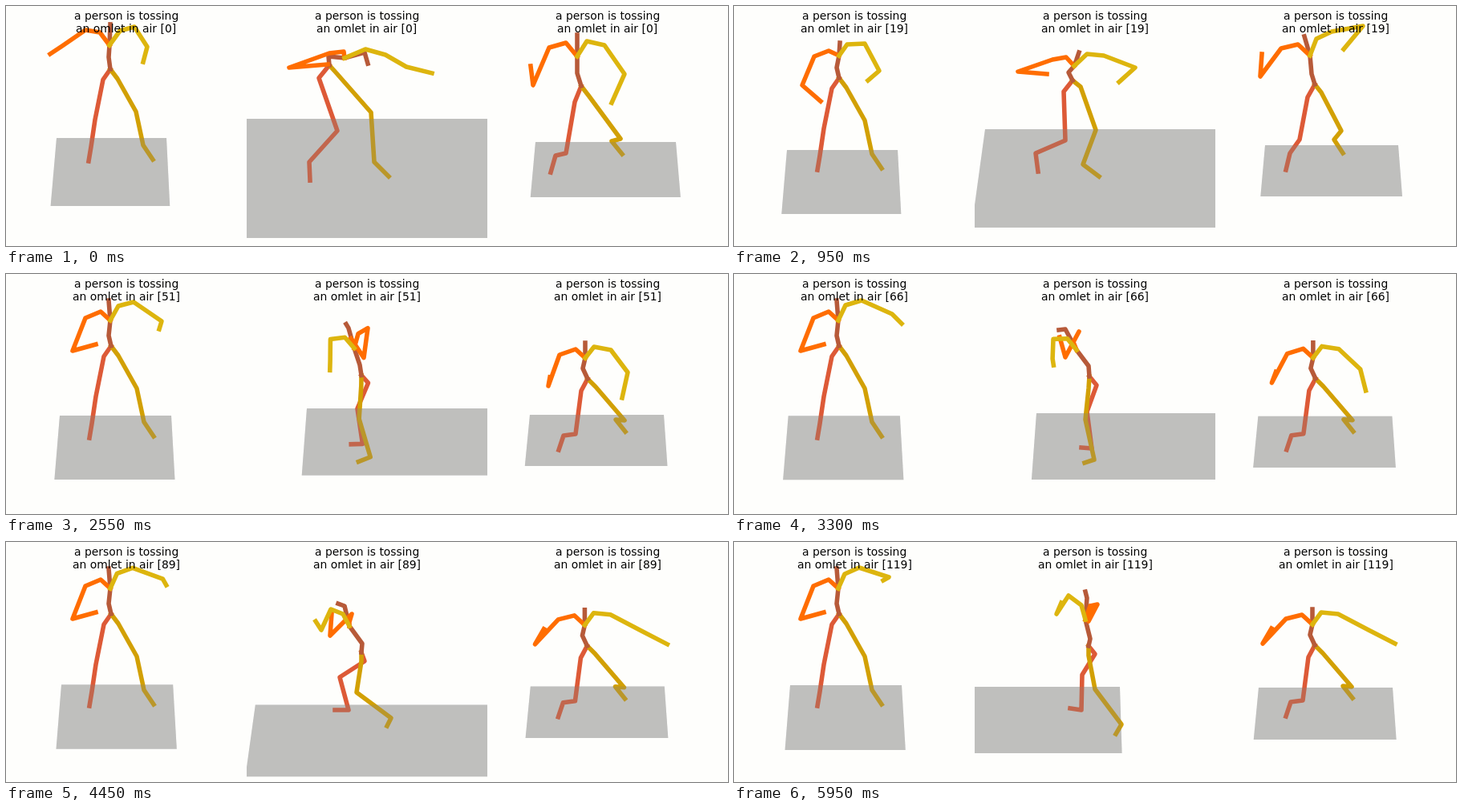
An HTML page with a canvas for the animation above (6 s loop, 900 px wide and 300 px high).

```html
<!DOCTYPE html>
<html lang="en">
<head>
<meta charset="utf-8">
<title>Stick figure motion</title>
<style>
html, body { margin: 0; width: 100%; height: 100%; overflow: hidden; background: #fefefc; }
canvas { display: block; }
</style>
</head>
<body>
<canvas id="stage" width="900" height="300"></canvas>
<script>
const ctx = document.getElementById('stage').getContext('2d');
const STEP = 50, FRAMES = 120, CHEST = 4;
const HAZE = 'rgba(128, 128, 128, 0.3)';

// Eases through a few poses keyed by frame, without overshoot; a lone pose is held.
function motion(keys) {
  const at = Object.keys(keys).map(Number);
  const poses = Object.values(keys);
  const last = at.length - 1;
  const rate = (i, j) => (poses[i + 1][j] - poses[i][j]) / (at[i + 1] - at[i]);
  const slope = (i, j) => {
    if (i === 0 || i === last) return 0;
    const a = rate(i - 1, j), b = rate(i, j);
    return a * b > 0 ? 2 * a * b / (a + b) : 0;
  };
  return f => {
    if (f >= at[last]) return poses[last];
    const i = at.findIndex(k => k > f) - 1;
    const h = at[i + 1] - at[i], u = (f - at[i]) / h, v = 1 - u;
    return poses[i].map((p, j) =>
      v * v * (1 + 2 * u) * p + u * u * (3 - 2 * u) * poses[i + 1][j] +
      h * u * v * (v * slope(i, j) - u * slope(i + 1, j)));
  };
}

// The pelvis is placed on the stage; spine and legs hang on it, arms on the chest.
// Spines run waist, chest, (neck,) head. Floors are left, right, far edge and depth.
const front = {
  center: 150,
  pelvis: motion({ 0: [130, 79], 19: [131, 90] }),
  floor: motion({ 0: [63, 200, 165, 85], 19: [66, 204, 180, 80], 51: [67, 206, 177, 80], 119: [70, 209, 179, 81] }),
  spine: motion({
    0: [-2, -15, -1, -30, 0, -56],
    19: [-3, -13, 0, -28, 1, -44],
    35: [-3, -13, 2, -25, 5, -43],
    51: [-3, -13, -1, -32, -3, -57]
  }),
  rightLeg: motion({ 0: [-9, 13, -19, 63, -24, 97, -27, 115] }),
  leftLeg: motion({ 0: [9, 12, 32, 53, 41, 95, 53, 113] }),
  rightArm: motion({
    0: [-12, -16, -30, -19, -59, 1, -74, 11],
    19: [-13, -6, -31, 1, -46, 37, -23, 57],
    35: [-11, -8, -29, 0, -51, 27, -30, 56],
    51: [-12, -11, -31, -3, -47, 38, -18, 30]
  }),
  leftArm: motion({
    0: [13, -18, 31, -23, 47, 2, 42, 21],
    19: [10, -14, 32, -15, 50, 19, 36, 31],
    35: [11, -15, 31, -21, 55, 6, 49, 7],
    51: [10, -18, 29, -23, 64, 1, 61, 11],
    66: [9, -19, 29, -25, 67, -8, 79, 4],
    119: [8, -18, 26, -26, 63, -14, 56, -10]
  })
};

const middle = {
  center: 450,
  pelvis: motion({ 0: [403, 74], 19: [422, 93], 35: [443, 125], 66: [443, 128], 89: [443, 138], 119: [442, 130] }),
  floor: motion({
    0: [290, 620, 141, 149],
    19: [313, 635, 154, 123],
    35: [369, 660, 163, 86],
    66: [377, 668, 174, 83],
    86: [322, 622, 204, 90],
    119: [190, 481, 181, 83]
  }),
  spine: motion({
    0: [-1, -11, 19, -9, 44, -16, 48, -2],
    19: [-5, -10, 2, -18, 5, -26, 8, -35],
    35: [-2, -14, -19, -36, -30, -62, -36, -69],
    51: [-2, -13, -9, -34, -16, -59, -19, -64],
    66: [-1, -13, -16, -33, -30, -59, -38, -58],
    89: [1, -11, -15, -33, -21, -58, -29, -61],
    119: [2, -9, -4, -33, -2, -60, -4, -68]
  }),
  rightLeg: motion({
    0: [-13, 16, 10, 82, -25, 121, -24, 144],
    19: [-11, 14, -9, 75, -46, 91, -43, 114],
    35: [7, 8, -8, 39, -3, 81, -20, 83],
    66: [9, 11, -3, 44, 3, 90, -10, 89],
    89: [4, 11, -27, 31, -16, 72, -33, 72],
    119: [8, 10, -8, 36, -9, 80, -23, 78]
  }),
  leftLeg: motion({
    0: [9, 10, 52, 59, 56, 121, 74, 139],
    19: [10, 8, 29, 62, 13, 105, 33, 120],
    35: [2, 10, 2, 55, 17, 100, 3, 108],
    66: [-1, 15, -5, 54, 6, 104, -6, 108],
    89: [0, 11, -6, 50, 37, 82, 32, 92],
    119: [0, 12, 8, 54, 41, 98, 34, 110]
  }),
  rightArm: motion({
    0: [-1, -8, -19, -6, -69, 12, -21, 8],
    19: [-10, -11, -27, -8, -70, 7, -34, 10],
    35: [3, -9, 3, -22, 2, -19, 2, -9],
    51: [5, -18, 17, -25, 12, 12, -4, -12],
    66: [-4, -10, 3, -23, -14, 9, -21, -16],
    89: [0, -5, 3, -15, -24, 12, -22, -16],
    119: [6, -17, 15, -19, 4, 2, 7, -17]
  }),
  leftArm: motion({
    0: [26, -11, 51, -4, 77, 11, 109, 19],
    19: [16, -15, 37, -13, 76, 2, 56, 20],
    35: [-8, -12, -26, -10, -33, 20, -45, 31],
    58: [-12, -14, -30, -12, -29, 13, -26, 25],
    89: [-8, -15, -23, -21, -35, 5, -42, -6],
    119: [-5, -18, -21, -30, -36, -7, -30, -21]
  })
};

const side = {
  center: 750,
  pelvis: motion({ 0: [717, 100], 19: [724, 98], 35: [724, 113], 51: [725, 131], 119: [724, 129] }),
  floor: motion({ 0: [660, 835, 170, 69], 19: [662, 828, 174, 64], 35: [650, 815, 173, 64], 51: [653, 820, 176, 64], 119: [654, 821, 182, 65] }),
  spine: motion({
    0: [-5, -16, -5, -37, -5, -64],
    19: [-4, -13, -6, -36, -13, -60],
    35: [-4, -13, -2, -31, -3, -52],
    51: [-6, -13, -3, -26, -3, -45]
  }),
  rightLeg: motion({
    0: [-8, 20, -19, 84, -32, 87, -38, 108],
    19: [-9, 16, -19, 69, -31, 86, -36, 107],
    51: [-8, 15, -15, 69, -30, 71, -36, 89]
  }),
  leftLeg: motion({
    0: [10, 13, 49, 66, 38, 69, 51, 85],
    19: [8, 10, 33, 58, 24, 69, 35, 86],
    51: [10, 10, 46, 52, 35, 51, 47, 66]
  }),
  rightArm: motion({
    0: [-14, -17, -35, -11, -55, 36, -58, 12],
    19: [-15, -14, -36, -9, -62, 26, -60, -2],
    35: [-13, -13, -33, -10, -55, 26, -52, 22],
    51: [-12, -11, -32, -4, -46, 35, -44, 24],
    89: [-13, -12, -33, -7, -62, 24, -51, 5]
  }),
  leftArm: motion({
    0: [12, -19, 34, -14, 59, 22, 43, 58],
    19: [8, -21, 27, -30, 66, -37, 42, -8],
    35: [11, -15, 33, -15, 59, 16, 46, 34],
    51: [11, -14, 32, -10, 53, 18, 46, 50],
    89: [11, -15, 32, -13, 70, 7, 103, 24]
  })
};

// The near edge spreads away from the middle of the view, more so on a deeper floor.
function floorPath([left, right, far, depth], center) {
  const near = x => center + (x - center) * (1 + depth / 1000);
  const path = new Path2D();
  path.moveTo(left, far);
  path.lineTo(right, far);
  path.lineTo(near(right), far + depth);
  path.lineTo(near(left), far + depth);
  path.closePath();
  return path;
}

function drawLimb(color, [x, y], joints) {
  ctx.beginPath();
  ctx.moveTo(x, y);
  for (let i = 0; i < joints.length; i += 2) ctx.lineTo(x + joints[i], y + joints[i + 1]);
  ctx.strokeStyle = color;
  ctx.stroke();
}

function centerText(text, x, y) {
  ctx.fillText(text, Math.round(x - ctx.measureText(text).width / 2), y);
}

function drawView(view, f) {
  const pelvis = view.pelvis(f), spine = view.spine(f);
  const chest = [pelvis[0] + spine[CHEST - 2], pelvis[1] + spine[CHEST - 1]];
  const floor = floorPath(view.floor(f), view.center);

  ctx.save();
  ctx.beginPath();
  ctx.rect(view.center - 150, 0, 300, 300);
  ctx.clip();
  // Half of the haze lies behind the figure, half in front of it.
  ctx.fillStyle = HAZE;
  ctx.fill(floor);
  drawLimb('#dd5a37', pelvis, view.rightLeg(f));
  drawLimb('#d2a004', pelvis, view.leftLeg(f));
  drawLimb('#b75a39', pelvis, spine);
  drawLimb('#ff6d00', chest, view.rightArm(f));
  drawLimb('#ddb50e', chest, view.leftArm(f));
  ctx.fill(floor);
  ctx.restore();

  ctx.fillStyle = '#000';
  centerText('a person is tossing', view.center, 17);
  centerText(`an omlet in air [${f}]`, view.center, 33);
}

function draw() {
  const f = Math.floor(performance.now() / STEP) % FRAMES;
  ctx.fillStyle = '#fefefc';
  ctx.fillRect(0, 0, 900, 300);
  ctx.font = '13.89px "DejaVu Sans", sans-serif';
  ctx.lineWidth = 5.56;
  ctx.lineCap = 'square';
  ctx.lineJoin = 'round';
  for (const view of [front, middle, side]) drawView(view, f);
  requestAnimationFrame(draw);
}
draw();
</script>
</body>
</html>
```
